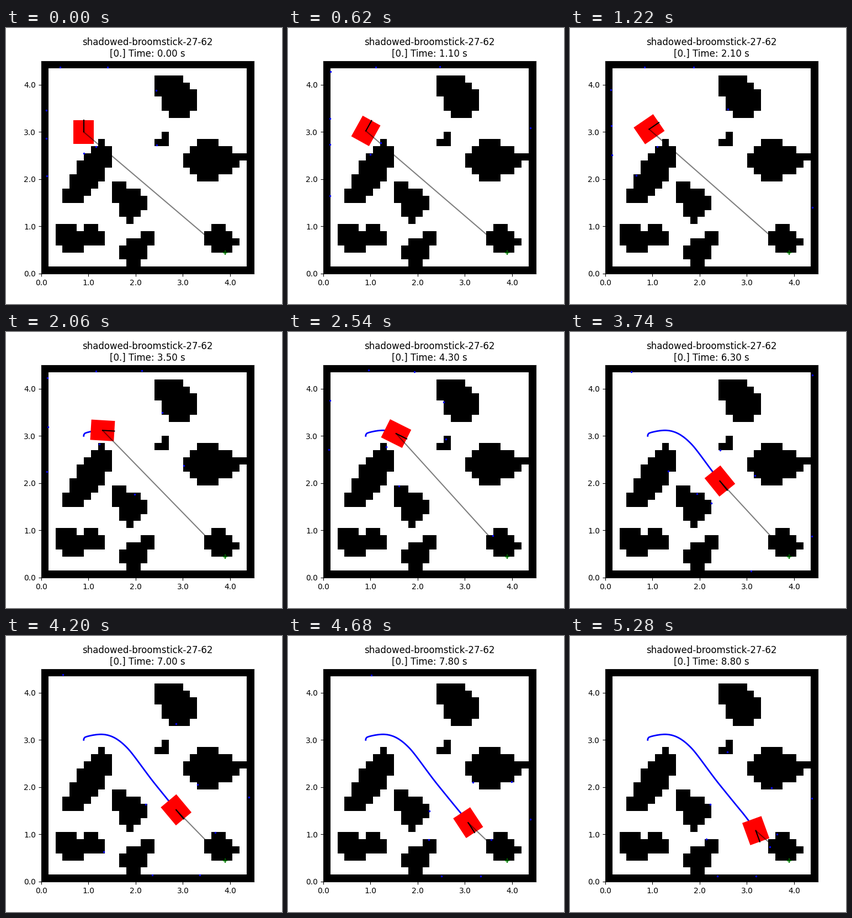
Recreate the animation shown at these times as a matplotlib script. Size 500 by 500 pixels, loop 5380 ms.

```python
import numpy as np
import matplotlib.pyplot as plt
from matplotlib.animation import FuncAnimation
from matplotlib.patches import Polygon

plt.rcParams["font.family"] = "DejaVu Sans"

N, CELL = 30, 0.15
SIZE = N * CELL
GOAL = np.array([3.9, 0.45])
LENGTH, WIDTH = 0.5, 0.43
LAST = 88          # last simulation step, 0.1 s each
TICK, LOOP = 20, 5380

# Obstacles are overlapping discs (column, row, radius) rasterised on the grid.
DISCS = [
    (19, 24, 2.3), (17.5, 26, 1.9), (16.7, 18.2, 0.9),
    (23, 15.5, 3.1), (26, 15.5, 1.6), (28, 16, 0.5),
    (8, 16.5, 1.6), (7, 14.7, 2.05), (5.5, 12.5, 1.7), (4, 10.6, 1.3),
    (12.3, 9.3, 1.9), (10.5, 11, 1.2), (12, 7, 0.5),
    (3, 5, 1.5), (4, 4, 1.5), (6.8, 4.7, 1.6),
    (12.5, 2.5, 1.7), (14.5, 4.5, 0.8),
    (24.5, 4.5, 1.7), (26.3, 3.7, 0.85),
]

# Key poses: time, x, y, heading in degrees.
KEYS = np.array([
    (0.0, 0.900, 3.000, 90.0),
    (2.1, 0.930, 3.058, 34.4),
    (3.5, 1.300, 3.118, -3.4),
    (5.2, 1.838, 2.815, -46.8),
    (6.3, 2.428, 2.046, -51.0),
    (7.0, 2.857, 1.520, -50.0),
    (8.8, 3.189, 1.080, -70.0),
])


def make_grid():
    row, col = np.indices((N, N))
    grid = (np.minimum(row, col) == 0) | (np.maximum(row, col) == N - 1)
    for cx, cy, r in DISCS:
        grid |= np.hypot(col - cx, row - cy) < r
    return grid


def hermite(t, knots, values, slopes):
    k = np.clip(np.searchsorted(knots, t, "right") - 1, 0, len(knots) - 2)
    h = knots[k + 1] - knots[k]
    s = (t - knots[k]) / h
    return ((1 + 2 * s) * (1 - s) ** 2 * values[k]
            + s * (1 - s) ** 2 * h * slopes[k]
            + s ** 2 * (3 - 2 * s) * values[k + 1]
            + s ** 2 * (s - 1) * h * slopes[k + 1])


def make_poses():
    """Drive along the heading, at rest at both ends of the path."""
    knots, x, y, deg = KEYS.T
    angle = np.radians(deg)
    mean = np.hypot(np.diff(x), np.diff(y)) / np.diff(knots)
    speed = np.zeros(len(knots))
    speed[1:-1] = 2 * mean[:-1] * mean[1:] / (mean[:-1] + mean[1:])
    t = np.arange(LAST + 1) * 0.1
    return np.column_stack([
        hermite(t, knots, x, speed * np.cos(angle)),
        hermite(t, knots, y, speed * np.sin(angle)),
        hermite(t, knots, angle, np.gradient(angle, knots)),
    ])


def cell_index(pos):
    return np.clip(np.floor(pos / CELL + 1e-9).astype(int), 0, N - 1)


def scan(x, y, angle):
    """March nine beams outwards and return their first occupied points."""
    beams = angle + np.radians(np.arange(-180, 180, 40))[:, None]
    reach = np.linspace(0, 5, 100)
    px = x + reach * np.cos(beams)
    py = y + reach * np.sin(beams)
    first = np.argmax(grid[cell_index(py), cell_index(px)], axis=1)
    rays = np.arange(len(first))
    return px[rays, first], py[rays, first]


def body(x, y, angle):
    c, s = np.cos(angle), np.sin(angle)
    corners = np.array([(1, 1), (1, -1), (-1, -1), (-1, 1)])
    corners = corners * (LENGTH / 2, WIDTH / 2)
    return corners @ np.array([(c, s), (-s, c)]) + (x, y)


grid = make_grid()
poses = make_poses()

fig, ax = plt.subplots(figsize=(5, 5), dpi=100)
ax.imshow(grid, cmap="binary", origin="lower", extent=(0, SIZE, 0, SIZE),
          interpolation="nearest")
for axis in (ax.xaxis, ax.yaxis):
    axis.set_ticks(range(5))
    axis.set_major_formatter("{x:.1f}")
ax.set_xlim(0, SIZE)
ax.set_ylim(0, SIZE)

title = ax.set_title("")
trail, = ax.plot([], [], color="blue", lw=2, zorder=3)
robot = ax.add_patch(Polygon(body(*poses[0]), fc="red", ec="none", zorder=4))
ax.scatter(*GOAL, marker="+", color="green", zorder=5)
nose, = ax.plot([], [], color="black", lw=1.5, zorder=6)
aim, = ax.plot([], [], color="black", alpha=0.5, lw=1.5, zorder=6)
hits, = ax.plot([], [], "o", color="blue", ms=1.5, mew=1, zorder=7)


def update(tick):
    # Steps alternate between 20 ms and 100 ms on screen.
    pair, rest = divmod(tick * TICK, 120)
    step = min(2 * pair + (rest >= 20), LAST)
    x, y, angle = poses[step]
    title.set_text(f"shadowed-broomstick-27-62\n[0.] Time: {step / 10:.2f} s")
    trail.set_data(poses[:step + 1, 0], poses[:step + 1, 1])
    robot.set_xy(body(x, y, angle))
    nose.set_data([x, x + LENGTH / 2 * np.cos(angle)],
                  [y, y + LENGTH / 2 * np.sin(angle)])
    aim.set_data([x, GOAL[0]], [y, GOAL[1]])
    hits.set_data(*scan(x, y, angle))
    return title, trail, robot, nose, aim, hits


anim = FuncAnimation(fig, update, frames=LOOP // TICK, interval=TICK,
                     repeat=True, repeat_delay=0)
plt.show()
```
